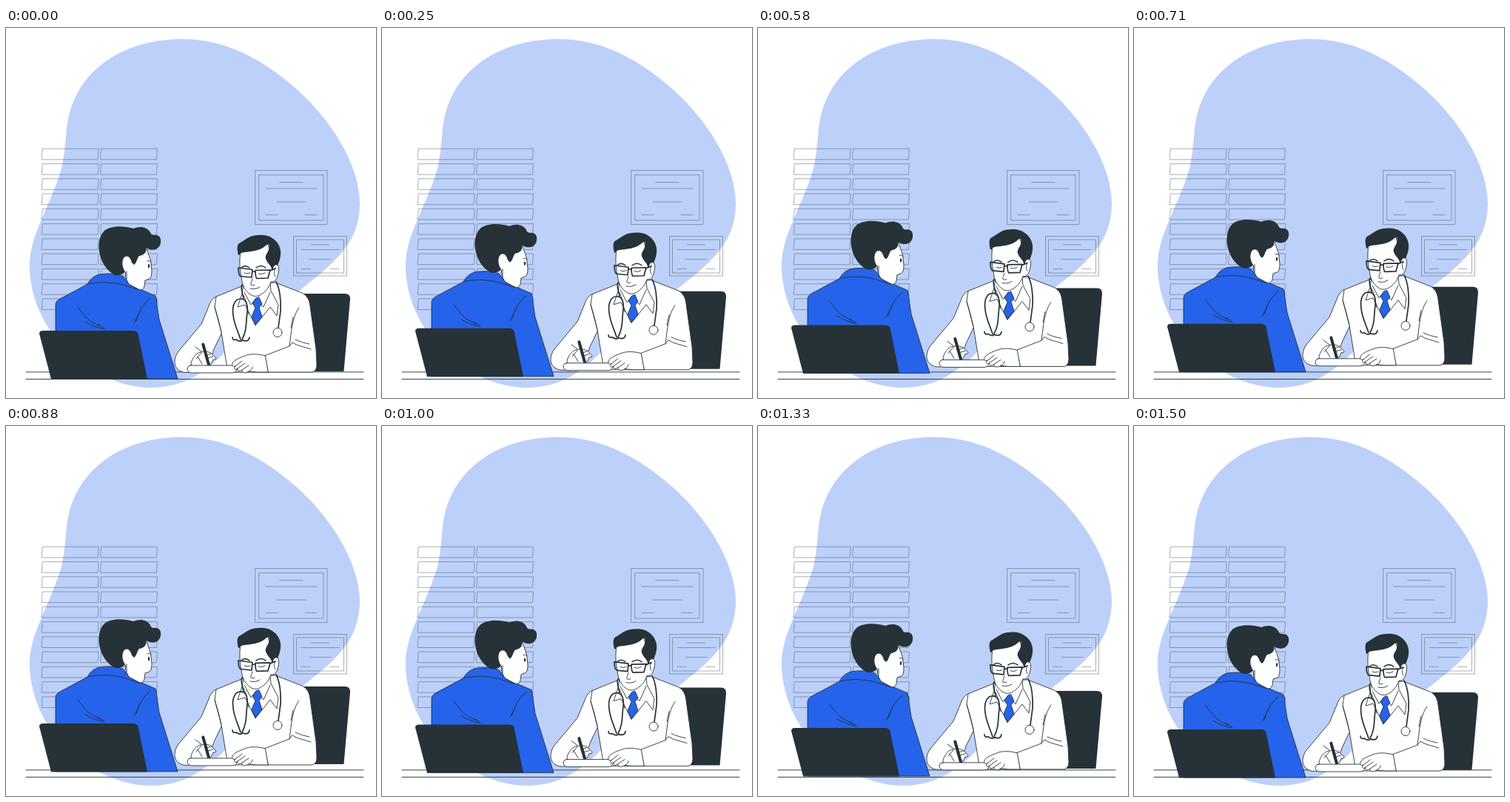
Recreate the animation shown at these times as an HTML page. Size 500 by 500 pixels, loop 1.54 s.

```html
<!DOCTYPE html>
<html lang="en">
<head>
<meta charset="utf-8">
<title>Consultation</title>
<style>
  html, body { margin: 0; width: 100%; height: 100%; overflow: hidden; background: #fff; }
  svg { display: block; width: 100%; height: 100%; }
  .line { fill: none; stroke: #263238; stroke-width: .9; stroke-linecap: round; stroke-linejoin: round; }
  .white { fill: #fff; }
  .blue { fill: #2563eb; }
  .dark { fill: #263238; }
  .brow { stroke-width: 1.5; }
  .tube { stroke-width: 1.7; }
  .pen { stroke-width: 4; }
  .faint { stroke-width: .8; opacity: .48; }
</style>
</head>
<body>
<svg viewBox="0 0 500 500">
  <path fill="#bdd0fa" d="M238 15C300 15 350 45 392 82C440 125 478 185 478 237C478 289 446 316 400 352C362 382 322 410 297 437C265 470 235 486 196 486C150 486 110 462 80 435C48 400 32 360 32 322C32 279 58 246 75 190C84 150 78 125 94 93C117 45 170 15 238 15Z"/>
  <path id="wall" class="line faint"/>
  <path class="line" d="M27 464.900H483M27 474.500H483"/>

  <g id="people">
    <!-- doctor's chair -->
    <path class="dark" d="M397 359H458Q465.500 359 465 367L456.500 464H400Z"/>

    <!-- writing arm -->
    <path class="line white" d="M284 363C279 365 276 370 274 376L264 400L233 437C227 445 226 456 232 461C237 466 244 466 250 465L276 449L281 434L292 411L300 380Z"/>

    <!-- coat -->
    <path class="line white" d="M321 348L284 363L282 377L291 411L298 454L300 465H414Q420 463 420 455L419 434L411 376C410 366 406 361 400 358L364 344Z"/>
    <path class="white" d="M284.700 366L283 376L289 388L292 372Z"/>
    <path class="line" d="M282 377L287 394L291 411M396 378C390 386 388 396 386 407L383 430L349 443L354 465M388 391L385 405M383 430L387 425C394 430 404 431 412 434M391 421C397 424 404 426 410 427"/>

    <!-- neck and shirt -->
    <path class="white" d="M321 346L357 340L358 356L340 366L324 358Z"/>
    <path class="line" d="M321 348L319 359L313 377L323 374L337 402L357 377L366 389L368 374L358 355L357 344M322 357L331 374L338 365L348 377L357 357M321 361L325 371L328 387"/>
    <path class="line blue" d="M338 365L333 372L337 378L332 390L337 401L346 390L342 378L346 373L342 364Z"/>

    <!-- head -->
    <path class="line white" d="M317 302C315 315 316 327 318 336C319 348 323 355 330 360C334 363 339 363 343 361C350 357 355 352 358 343C364 344 367 338 368 331C370 322 367 317 362 320L354 292Z"/>
    <path class="dark" d="M314 307C312 299 312 293 315 291C320 288 323 286 328 283C335 279 347 279 354 281C363 284 370 292 371 301C372 309 369 316 367 321C364 319 361 322 361 326L359 327C359 321 354 319 352 314C349 309 352 306 354 302C356 298 356 293 355 292C352 292 347 299 340 300C331 303 323 302 318 304C316 305 316 307 314 307Z"/>
    <path class="line brow" d="M318 324C321 321 325 321 329 324M338 324C342 321 347 321 351 324"/>
    <path class="line" d="M322 331Q326 333 330 331M341 332Q346 334 350 331M333 339C332 343 330 346 331 347Q333 349 336 347M330 352Q337 354 343 350M364 325C362 329 362 333 364 336"/>
    <path class="line tube" d="M314 324L333 326.500L332 337L317 335.500Q314 334 314 324ZM337 327.500L357 327L354 338L339 338.500Q337 337 337 327.500ZM333 329L337 329.500M357 328L364 325"/>

    <!-- stethoscope -->
    <path class="line tube" d="M319 347C316 353 321 360 321 367M365 343C370 352 372 369 371 383L368 405M317 421C314 411 308 400 307 388C305 374 310 366 317 366C324 366 327 373 326 384C324 397 326 408 319 421M306 418C306 421 308 422 311 421Q316 425 320 422Q326 424 328 421L329 418"/>
    <circle class="line white" cx="367" cy="411.500" r="6"/>

    <!-- pad and hands -->
    <path class="line white" d="M250 453C252 445 258 438 264 438C270 436 276 438 279 441L284 446Q284 449 280 448L278 453L270 458H252Z"/>
    <path class="line" d="M256 431L264 437M259 444L265 454M269 443L277 440M273 446L280 444M264 439L257 447M273 453L276 459"/>
    <path class="line pen" d="M266.300 427.500L274 455"/>
    <path class="line white" d="M249 456H306Q312 457 312 462Q311 466 306 466H250Q245 465 245 460Q246 456 249 456Z"/>
    <path class="line white" d="M350 443C341 440 329 440 323 443C317 445 309 448 306 453C305 457 307 458 310 457C307 460 309 463 313 460C312 464 315 465 319 462C318 466 323 467 328 464L339 465H354Z"/>
    <path class="line" d="M310 457L319 450M313 460L323 453M319 462L328 456M328 464Q333 462 333 458"/>

    <!-- patient -->
    <path class="line blue" d="M110 346C114 339 119 335 126 333C137 331 150 332 158 335L167 347L202 362Q204 366 204 374L207 394L232 474H67V374Q67 369 73 366Z"/>
    <path class="line white" d="M160 304L190 298C192 306 196 312 196 319L197 328Q197 337 194 339L188 341L187 349Q185 356 179 353L166 346L162 338Z"/>
    <path class="line" d="M110 346C128 342 149 343 167 350L180 354M97 377C104 387 113 399 127 402M107 397C115 402 123 405 133 407M124 402L132 405M195 365C184 374 180 383 176 396M173 399L182 381"/>
    <path class="dark" d="M148 334C138 330 130 319 127 307C124 294 125 281 134 273C143 267 159 267 172 271C181 267 191 269 195 276Q196 280 200 280C207 279 210 284 209 290C208 298 201 301 194 299L189 297C191 303 186 307 180 308C177 311 177 317 173 320L160 330C158 333 153 334 148 334Z"/>
    <path class="white" d="M163 331C157 326 156 316 159 311C163 306 168 309 170 317L173 320L177 321L175 340L163 341Z"/>
    <path class="line" d="M163 329V341M191 315Q194 313 196 316"/>
    <ellipse class="dark" cx="193" cy="321.500" rx="1.200" ry="2.700"/>
    <path class="dark" d="M45 413Q45 409 50 409H172Q177 409 178.500 413L191 474.500H61Z"/>
  </g>
</svg>
<script>
const LOOP = 1540, STEPS = 37, PEAK = 17, RISE = 10;
const people = document.getElementById('people');

const box = (x, y, w, h) => `M${x} ${y}h${w}v${h}h${-w}z`;
const dash = (x1, x2, y) => `M${x1} ${y}H${x2}`;

function wallPath() {
  let d = '';
  for (let row = 0; row < 11; row++) {
    const y = 163.2 + row * 20.27;
    for (const x of [49.6, 129]) d += `M${x} ${y}h75.500l-1 14.600h-75.500z`;
  }
  d += box(337, 192.5, 97, 73) + box(342, 198.5, 87, 61.5);
  d += dash(370, 401, 208.5) + dash(351, 420, 217) + dash(366, 405, 235);
  d += dash(351, 367, 252.5) + dash(404, 420, 252.5);
  d += box(389, 281.5, 71.5, 53.5) + box(393, 286, 63.5, 45);
  d += dash(413, 436, 293) + dash(399, 450, 299.5) + dash(410, 439, 312.5);
  return d + dash(399, 411, 325.5) + dash(438, 450, 325.5);
}

// Triangle wave at 24 steps a second; highest at PEAK.
function draw(ms) {
  const step = Math.floor((ms % LOOP + 4) * STEPS / LOOP) % STEPS;
  const drop = at => RISE * Math.abs(at - PEAK) / (STEPS / 2);
  const y = drop(step) - drop(0);
  people.setAttribute('transform', `translate(0 ${y.toFixed(3)})`);
}

document.getElementById('wall').setAttribute('d', wallPath());
let start = null;
function tick(now) {
  if (start === null) start = now;
  draw(now - start);
  requestAnimationFrame(tick);
}
draw(0);
requestAnimationFrame(tick);
</script>
</body>
</html>
```
